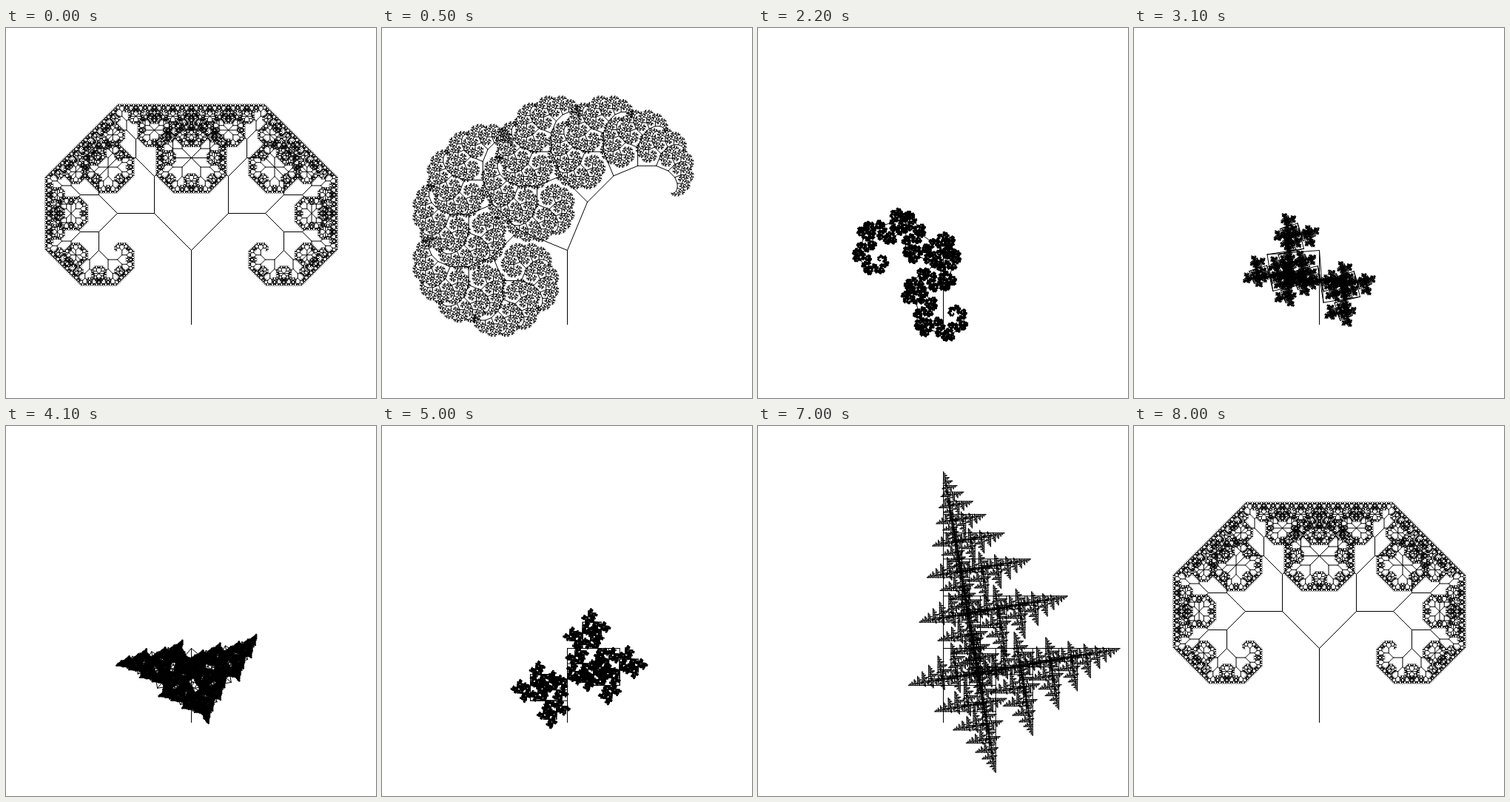
Write an HTML page with a canvas that moves like this. It is 500x500 px and loops after 8.1 s.

```html
<!DOCTYPE html>
<html lang="en">
<head>
<meta charset="utf-8">
<title>Turning fractal tree</title>
<style>
  html, body { margin: 0; width: 100%; height: 100%; overflow: hidden; background: #fff; }
  canvas { display: block; width: 500px; height: 500px; }
</style>
</head>
<body>
<canvas id="stage" width="500" height="500"></canvas>
<script>
const SIZE = 500, LEVELS = 14, STEP_MS = 100, STEPS = 81;
const RAD = Math.PI / 180, RATIO = Math.SQRT1_2;

const ctx = document.getElementById('stage').getContext('2d', { willReadFrequently: true });
ctx.translate(0.5, 0.5); // whole coordinates fall on pixel centres
ctx.lineCap = 'round';

// Headings are degrees counter-clockwise from straight up
function branch(x, y, length, heading, level, left, right) {
  const endX = x - length * Math.sin(heading * RAD);
  const endY = y - length * Math.cos(heading * RAD);
  ctx.beginPath();
  ctx.moveTo(x, y);
  ctx.lineTo(endX, endY);
  ctx.stroke();
  if (level === 1) return;
  branch(endX, endY, length * RATIO, heading + left, level - 1, left, right);
  branch(endX, endY, length * RATIO, heading + right, level - 1, left, right);
}

function draw(step) {
  const turn = step * 4.5;
  ctx.fillStyle = '#fff';
  ctx.fillRect(-1, -1, SIZE + 2, SIZE + 2);
  branch(250, 400, 100, 0, LEVELS, turn + 45, turn - 45);
}

let shown = -1;
function tick(now) {
  const step = Math.floor(now / STEP_MS) % STEPS;
  if (step !== shown) draw(shown = step);
  requestAnimationFrame(tick);
}
draw(0);
requestAnimationFrame(tick);
</script>
</body>
</html>
```
